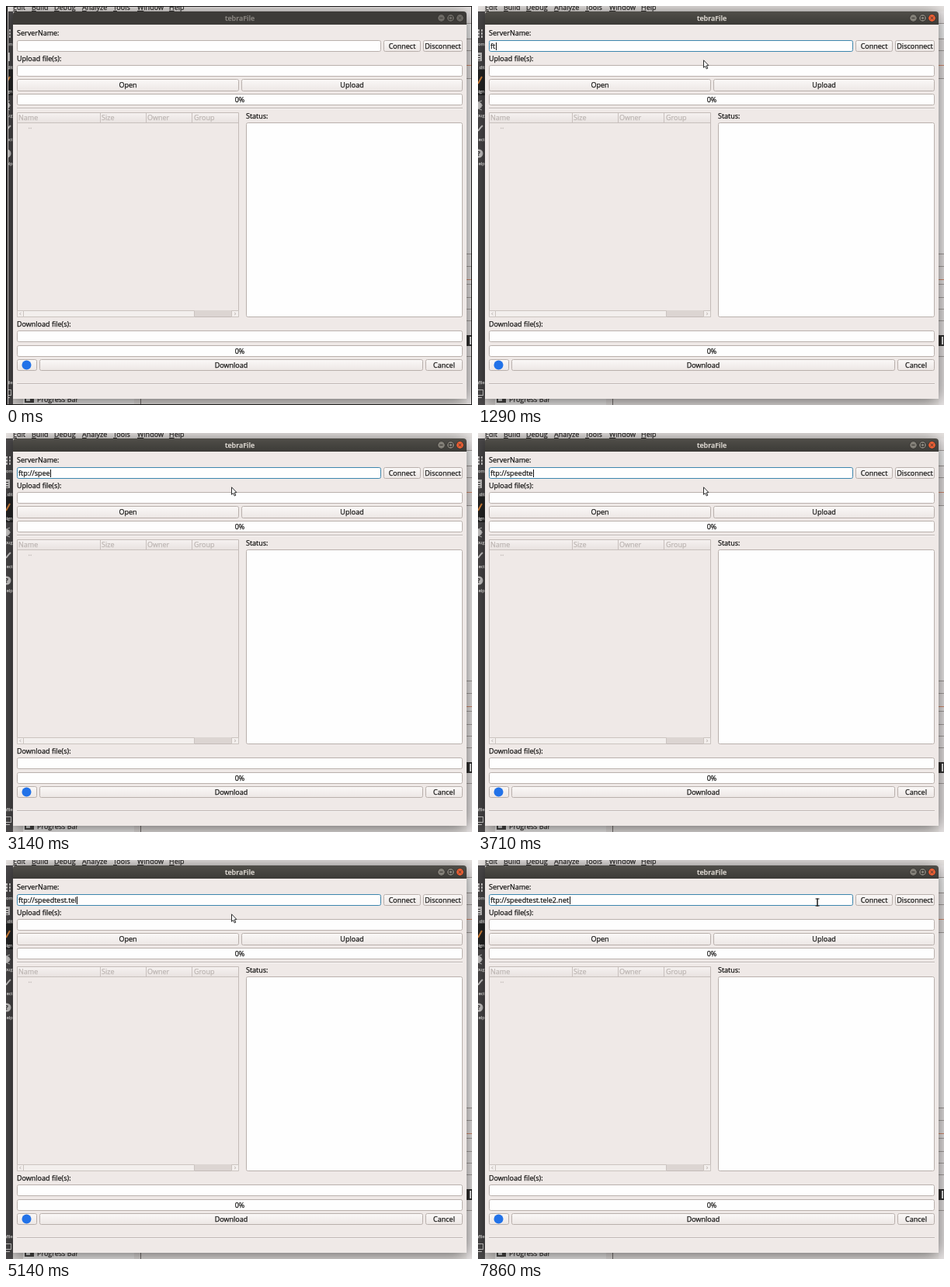
An HTML page with a canvas for the animation above (8 s loop, 600 by 514 pixels).

```html
<!DOCTYPE html>
<html lang="en">
<head>
<meta charset="utf-8">
<title>tebraFile</title>
<style>
html, body { margin: 0; width: 100%; height: 100%; overflow: hidden; background: #eae6e4; }
canvas { display: block; width: 600px; height: 514px; }
</style>
</head>
<body>
<canvas id="stage" width="600" height="514"></canvas>
<script>
const ctx = document.getElementById('stage').getContext('2d');
const LOOP = 8000;
const FONT = '"Open Sans", "Noto Sans", sans-serif';
const INK = '#171615', BODY = '#efe9e7', EDGE = '#b9b0ac', PALE = '#bdb6b3';
const URL_TEXT = 'ftp://speedtest.tele2.net';

// [time, characters typed so far, mistyped tail]
const KEYS = [
  [1140, 1], [1290, 2], [1430, 3], [1860, 4], [2000, 5], [2430, 6], [2710, 7],
  [3000, 8], [3140, 10], [3430, 11], [3570, 12], [3710, 13], [4000, 15],
  [4570, 16], [4860, 17], [5000, 18], [5140, 19], [5290, 20], [5710, 21],
  [6000, 21, '/'], [6290, 21], [6570, 22], [7000, 24], [7140, 25]
];

function fill(x, y, w, h, color) {
  ctx.fillStyle = color;
  ctx.fillRect(x, y, w, h);
}

function text(str, x, y, { size = 9, color = INK, align = 'left', weight = 400 } = {}) {
  ctx.font = `${weight} ${size}px ${FONT}`;
  ctx.textAlign = align;
  ctx.fillStyle = ctx.strokeStyle = color;
  ctx.lineWidth = 0.25;
  ctx.fillText(str, x, y);
  ctx.strokeText(str, x, y);
}

function line(points, color, width = 1) {
  ctx.beginPath();
  points.forEach(([x, y]) => ctx.lineTo(x, y));
  ctx.strokeStyle = color;
  ctx.lineWidth = width;
  ctx.stroke();
}

function disc(x, y, r, color) {
  ctx.beginPath();
  ctx.arc(x, y, r, 0, Math.PI * 2);
  ctx.fillStyle = color;
  ctx.fill();
}

function vertical(y, h, top, bottom) {
  const g = ctx.createLinearGradient(0, y, 0, y + h);
  g.addColorStop(0, top);
  g.addColorStop(1, bottom);
  return g;
}

function box(x, y, w, h, paint = '#fefefe', edge = EDGE, r = 2) {
  ctx.beginPath();
  ctx.roundRect(x + 0.5, y + 0.5, w - 1, h - 1, r);
  ctx.fillStyle = paint;
  ctx.fill();
  ctx.strokeStyle = edge;
  ctx.lineWidth = 1;
  ctx.stroke();
}

function button(label, x, y, w, h = 16) {
  box(x, y, w, h, vertical(y, h, '#fbf9f8', '#ece6e4'));
  text(label, x + w / 2, y + h / 2 + 3, { align: 'center' });
}

function progress(y) {
  box(14, y, 574, 15);
  text('0%', 301, y + 10.5, { align: 'center' });
}

function separator(y) {
  fill(14, y, 574, 1, '#bfb7b4');
  fill(14, y + 1, 574, 1, '#f8f5f4');
}

function sidebar() {
  fill(0, 7, 9, 507, '#4d4b4c');
  fill(0, 82, 9, 33, '#262626');
  const labels = [['com', 51], ['dit', 81], ['sign', 112], ['bug', 143], ['ect', 174], ['elp', 205], ['afile', 487]];
  for (const [s, y] of labels) text(s, 8.5, y, { size: 5.5, color: '#e2e0df', align: 'right' });
  const light = '#d8d6d5';
  for (let i = 0; i < 6; i++) fill(i % 2 * 4, 30 + (i >> 1) * 4, 2, 3, light);
  fill(0, 60, 5, 11, light);
  for (let y = 63; y < 70; y += 3) fill(0, y, 3, 1, '#454344');
  line([[0, 100], [5, 91]], '#e58b3e', 2);
  disc(1, 128, 4, light);
  line([[0, 124], [5, 122]], light);
  line([[1, 128], [6, 128]], light);
  line([[0, 132], [5, 134]], light);
  line([[0, 161], [4, 156], [6, 154]], light, 2);
  disc(1, 190, 5.5, light);
  text('?', 1, 193, { size: 8, color: '#454344', align: 'center', weight: 700 });
  ctx.strokeStyle = light;
  ctx.lineWidth = 1;
  ctx.strokeRect(-1.5, 494.5, 8, 7);
  fill(0, 504, 5, 1, light);
}

function backdrop() {
  fill(0, 0, 600, 514, '#eae6e4');
  const menu = [['Edit', 9], ['Build', 33], ['Debug', 62], ['Analyze', 98], ['Tools', 138], ['Window', 169], ['Help', 210]];
  for (const [s, x] of menu) {
    text(s, x, 5, { color: '#2c2a29' });
    fill(x, 6, ctx.measureText(s[0]).width, 1, '#3b3938');
  }
  sidebar();

  fill(593, 7, 7, 507, '#eeeaea');
  fill(593, 23, 7, 18, '#fafafa');
  fill(593, 94, 7, 224, '#f7f5f5');
  for (const y of [22, 42, 57, 93, 319, 335, 358, 375, 390, 405, 451]) fill(593, y, 7, 1, '#aaa5a2');
  for (const y of [76, 352]) fill(593, y, 7, 1, '#dc8f70');
  fill(593, 424, 7, 14, '#343332');
  fill(597, 426, 2, 10, '#f2f2f2');

  fill(9, 506, 13, 8, '#d8d4d2');
  fill(22, 506, 143, 8, '#f5f3f2');
  fill(173, 506, 1, 8, '#77716f');
  fill(24, 502, 12, 9, '#4a4847');
  fill(26, 506, 5, 3, '#dedede');
  text('Progress Bar', 40, 509.5, { color: '#353231' });
}

// Window body with its soft drop shadow
function windowBody() {
  ctx.save();
  ctx.shadowColor = 'rgba(0, 0, 0, 0.6)';
  ctx.shadowBlur = 22;
  ctx.shadowOffsetY = 3;
  ctx.beginPath();
  ctx.roundRect(9, 7, 584, 499, [4, 4, 0, 0]);
  ctx.fillStyle = BODY;
  ctx.fill();
  ctx.restore();
}

function titleBar(active) {
  ctx.beginPath();
  ctx.roundRect(9, 7, 584, 17, [4, 4, 0, 0]);
  ctx.fillStyle = active ? vertical(7, 17, '#504e49', '#3c3b37') : '#3d3b38';
  ctx.fill();
  text('tebraFile', 301, 18.5, { align: 'center', weight: 600, color: active ? '#dfdad3' : '#8b8782' });
  const mark = active ? '#383632' : '#403e3a';
  for (const x of [560.5, 572.5, 584.5]) {
    disc(x, 15.5, 5, '#32302d');
    disc(x, 15.5, 4.4, active ? (x > 580 ? '#ec5f34' : '#827f77') : '#6d6a65');
  }
  line([[558.5, 15.5], [562.5, 15.5]], mark);
  ctx.strokeRect(570.5, 13.5, 4, 4);
  line([[582.7, 13.7], [586.3, 17.3]], mark);
  line([[586.3, 13.7], [582.7, 17.3]], mark);
}

function fileList() {
  box(14, 137, 286, 264, BODY, '#c3bbb7', 0);
  fill(15, 138, 284, 12, vertical(138, 12, '#f5f1f0', '#e9e3e1'));
  fill(15, 150, 284, 1, '#c8c0bd');
  for (const x of [121, 180, 239]) fill(x, 138, 1, 12, '#c8c0bd');
  const heads = [['Name', 16], ['Size', 123], ['Owner', 182], ['Group', 242]];
  for (const [s, x] of heads) text(s, x, 147, { color: PALE });
  text('..', 28.5, 158, { color: PALE });

  fill(15, 392, 284, 8, '#dcd5d2');
  for (const [x, w] of [[14, 9], [22, 221], [290, 10]]) box(x, 392, w, 9, '#f3efed', '#cbc4c0', 0);
  line([[19.5, 395], [17.5, 396.5], [19.5, 398]], '#b5adaa', 0.8);
  line([[294, 395], [296, 396.5], [294, 398]], '#b5adaa', 0.8);
}

function serverField(t, active) {
  box(14, 44, 469, 15, '#fefefe', active ? '#3d86ad' : EDGE);
  if (!active) return;
  const [, count, tail = ''] = KEYS.findLast(k => k[0] <= t) || [0, 0];
  const typed = URL_TEXT.slice(0, count) + tail;
  text(typed, 16, 54.5);
  const caretOn = t < 860 || t >= 1140;
  if (caretOn) fill(Math.ceil(16 + ctx.measureText(typed).width), 47, 1, 10, '#111');
}

function form(t, active) {
  windowBody();
  titleBar(active);
  text('ServerName:', 14, 38);
  serverField(t, active);
  button('Connect', 486, 44, 48, 15);
  button('Disconnect', 537, 44, 51, 15);
  text('Upload file(s):', 14, 71);
  box(14, 76, 574, 15);
  button('Open', 14, 94, 286);
  button('Upload', 303, 94, 285);
  progress(113);
  separator(131);
  fileList();
  text('Status:', 309, 145);
  box(309, 150, 279, 251);
  text('Download file(s):', 14, 412.5);
  box(14, 418, 574, 15);
  progress(437);
  button('', 14, 455, 26, 15);
  disc(26.5, 462.5, 6, '#2272e8');
  button('Download', 43, 455, 494, 15);
  button('Cancel', 540, 455, 48, 15);
  separator(486);
}

function arrow(x, y) {
  ctx.beginPath();
  const shape = [[0, 0], [0, 9.5], [2.2, 7.6], [3.8, 11.2], [5.3, 10.4], [3.8, 7], [6.4, 6.7]];
  shape.forEach(([dx, dy]) => ctx.lineTo(x + dx, y + dy));
  ctx.closePath();
  ctx.fillStyle = '#fff';
  ctx.fill();
  ctx.strokeStyle = '#2a2a2a';
  ctx.lineWidth = 1;
  ctx.stroke();
}

function beam(x, y) {
  fill(x - 0.75, y, 1.5, 10, '#1c1c1c');
  fill(x - 2.5, y, 5, 1, '#1c1c1c');
  fill(x - 2.5, y + 9, 5, 1, '#1c1c1c');
}

function pointer(t) {
  if (t < 290) return;
  if (t < 7710) arrow(290.5, 69.8);
  else if (t < 7860) arrow(320.5, 71.5);
  else beam(437, 49.5);
}

function captureFrame() {
  fill(0, 0, 600, 1, '#1d1c1c');
  fill(0, 0, 2, 514, '#1d1c1c');
  fill(2, 1, 1, 512, '#c9c5c3');
  fill(0, 513, 600, 1, '#1d1c1c');
  fill(599, 0, 1, 514, '#1d1c1c');
}

function draw(now) {
  const t = now % LOOP;
  const active = t >= 140;
  backdrop();
  form(t, active);
  if (!active) captureFrame();
  pointer(t);
  requestAnimationFrame(draw);
}

draw(0);
</script>
</body>
</html>
```
